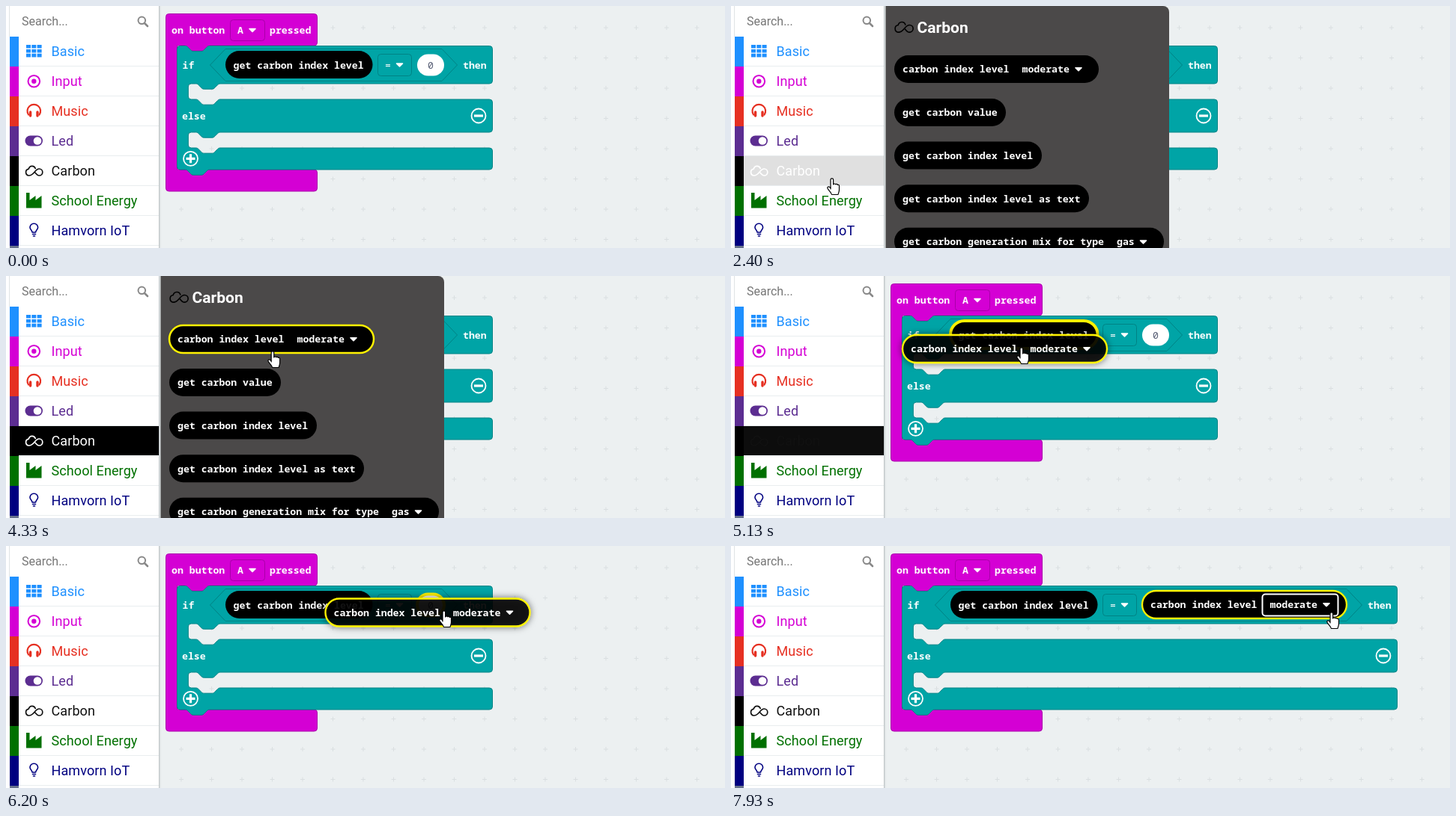
Animation, 960 px wide and 324 px high, one loop 8000 ms. Source, as an HTML page:

```html
<!DOCTYPE html>
<html lang="en">
<head>
<meta charset="utf-8">
<title>Block editor</title>
<style>
  html, body { margin: 0; width: 100%; height: 100%; overflow: hidden; background: #ecf0f1; }
  svg { display: block; width: 960px; height: 324px; }
  text { white-space: pre; }
  .code { font: 700 13.2px "Noto Sans Mono", "DejaVu Sans Mono", monospace; fill: #fff; }
  .label { font: 18px Roboto, sans-serif; letter-spacing: .1px; }
  .search { font: 16px Roboto, sans-serif; fill: #767676; }
  .title { font: 700 21px Roboto, sans-serif; fill: #fff; }
  .teal { fill: #00a4a6; stroke: #008385; }
  .pink { fill: #d400d4; stroke: #aa00aa; }
  .field { fill: none; }
  .line { fill: none; stroke-linecap: round; stroke-linejoin: round; }
</style>
</head>
<body>
<svg id="stage" viewBox="0 0 960 324"></svg>
<script>
const YELLOW = '#fff200';
const STEP = 200 / 3;
const LOOP = 8000;

// Connector shapes, drawn rightwards and leftwards
const notchR = 'c1.8 0 2.7.9 3.6 1.8l3.6 3.6c.9.9 1.8 1.8 3.6 1.8h10.8c1.8 0 2.7-.9 3.6-1.8l3.6-3.6c.9-.9 1.8-1.8 3.6-1.8';
const notchL = 'c-1.8 0-2.7.9-3.6 1.8l-3.6 3.6c-.9.9-1.8 1.8-3.6 1.8h-10.8c-1.8 0-2.7-.9-3.6-1.8l-3.6-3.6c-.9-.9-1.8-1.8-3.6-1.8';

const code = (x, y, s, more = '') => `<text class="code" x="${x}" y="${y}" ${more}>${s}</text>`;
const caret = (x, y) =>
  `<path d="M${x - 4} ${y - 2}h8l-4 4z" fill="#fff" stroke="#fff" stroke-width="1.6" stroke-linejoin="round"/>`;
const pill = (x, y, w, more = '') => `<rect x="${x}" y="${y}" width="${w}" height="37" rx="18.5" ${more}/>`;
const field = (x, y, w, h, color, more = '') =>
  `<rect class="field" x="${x}" y="${y}" width="${w}" height="${h}" rx="4" stroke="${color}" ${more}/>`;
const ring = (x, y, bars) =>
  `<circle cx="${x}" cy="${y}" r="9.5" fill="none" stroke="#fff" stroke-width="1.8"/>
   <path d="${bars}" stroke="#fff" stroke-width="3.2"/>`;

const levelPill = id => `<g id="${id}">
  ${pill(0, 0, 273, 'class="body"')}
  ${code(11, 23.3, 'carbon index level')}${code(170.5, 23.3, 'moderate')}${caret(246, 18.7)}
  ${field(160.5, 4.5, 101, 29, '#fff', 'stroke-width="2" visibility="hidden"')}
</g>`;

const cloud = 'M5 14.5A4.5 4.5 0 0 1 4.8 5.6C6 .8 12.3.5 13.7 5M5 14.5C12 14.5 13 5.5 18.8 5.5A4.5 4.5 0 0 1 18.8 14.5C16 14.5 14.500 12 12.700 9.700';

function ifPath(right) {
  const mouth = (y, end) =>
    `a4 4 0 0 1-4 4H286${notchL}h-6.3a4 4 0 0 0-4 4V${end - 4}a4 4 0 0 0 4 4h6.3${notchR}H${right - 4}a4 4 0 0 1 4 4`;
  return `M228.5 57.5a4 4 0 0 1 4-4H239.3${notchR}H${right - 4}a4 4 0 0 1 4 4V100${mouth(100, 125)}` +
    `V165${mouth(165, 190)}V215a4 4 0 0 1-4 4H271.7${notchL}H232.5a4 4 0 0 1-4-4z`;
}
const hexPath = tip => `M272.5 79L293 57.5H${tip - 20.5}L${tip} 79L${tip - 20.5} 100.5H293z`;

function grid() {
  let d = '';
  for (let x = 234; x < 960; x += 40.5)
    for (let y = 29; y < 324; y += 40.5) d += `M${x - 3} ${y}h6M${x} ${y - 3}v6`;
  return `<path d="${d}" stroke="#dadfe1" fill="none"/>`;
}

function workspace() {
  return `${grid()}
  <path class="pink" d="M213.5 14.5a4 4 0 0 1 4-4H411.5a4 4 0 0 1 4 4V49a4 4 0 0 1-4 4H271.7${notchL}H228.5V219H411.5a4 4 0 0 1 4 4V244a4 4 0 0 1-4 4H217.5a4 4 0 0 1-4-4z"/>
  ${code(221, 37, 'on button')}${field(299.5, 18.5, 46, 28, '#a900a9')}
  ${code(309, 37, 'A')}${caret(329, 32.5)}${code(352, 37, 'pressed')}
  <path id="ifBlock" class="teal"/>
  <path id="hex" class="teal"/>
  ${code(235.5, 84, 'if')}${code(235, 152, 'else')}
  ${ring(246.5, 204.3, 'M240.5 204.3h12M246.5 198.3v12')}
  <g id="shift">${code(610, 84, 'then')}${ring(631, 147, 'M625 147h12')}</g>
  ${pill(293, 60, 196.5, 'id="getPill"')}${code(303.5, 84, 'get carbon index level')}
  ${field(496.5, 64.5, 45, 29, '#008385')}${code(506, 84, '=', 'style="font-weight:400"')}${caret(525.5, 79)}
  <g id="zero"><rect id="zeroBox" x="549" y="64.5" width="36" height="29" rx="14.5" fill="#fff"/>
    ${code(563, 84, '0', 'style="fill:#575e75;font-weight:400"')}</g>`;
}

function flyout() {
  const names = [['get carbon value', 149], ['get carbon index level', 197],
    ['get carbon index level as text', 260], ['get carbon generation mix for type', 360]];
  return `<g id="flyout"><rect x="190" y="0" width="395" height="340" rx="8" fill="#4b4949"/>
  <path class="line" d="${cloud}" transform="translate(218 19.5) scale(1.08)" stroke="#000" stroke-width="1.5"/>
  <text class="title" x="248.5" y="35.5">Carbon</text>
  <g transform="translate(218 66)">${levelPill('stock')}</g>
  ${names.map(([s, w], i) => pill(218, 124 + 57.6 * i, w) + code(229, 147.3 + 57.6 * i, s)).join('')}
  ${code(515, 320.3, 'gas')}${caret(550.5, 316)}</g>`;
}

function sidebar() {
  const rows = [['Basic', '#1e90ff'], ['Input', '#d400d4'], ['Music', '#e63022'], ['Led', '#5c2d91'],
    ['Carbon', '#000'], ['School Energy', '#007000'], ['Hamvorn IoT', '#000080'], ['', '#66718c']];
  let cells = '';
  for (let i = 0; i < 9; i++)
    cells += `M${27 + (i % 3) * 7.3} ${52 + Math.floor(i / 3) * 5.9}h6v4.6h-6z`;
  const list = rows.map(([name, color], i) => {
    const y = 41 + 40 * i, carbon = name === 'Carbon';
    return `<rect x="5" y="${y}" width="12" height="40" fill="${color}"/>
      ${carbon ? `<rect id="row" x="17" y="${y}" width="187" height="39.5"/>` : ''}
      <path d="M17 ${y + 39.5}h187" stroke="#e9edef"/>
      <text class="label" x="60.5" y="${y + 26}" fill="${color}" ${carbon ? 'id="rowText"' : ''}>${name}</text>`;
  }).join('');
  return `<rect x="204" width="1" height="324" fill="#bfc5c7"/><rect x="205" width="1.5" height="324" fill="#dce1e2"/>
  <rect width="204" height="324" fill="#fff"/>
  <path d="M4.5 0v41" stroke="#e0e4e5"/>
  <text class="search" x="21" y="26">Search...</text>
  <circle cx="181.3" cy="19.3" r="4.8" fill="none" stroke="#888" stroke-width="2"/>
  <path class="line" d="M185 23l4 4" stroke="#888" stroke-width="2.6"/>
  ${list}
  <path d="${cells}" fill="#1e90ff"/>
  <circle cx="37.3" cy="100.7" r="7.8" fill="none" stroke="#d400d4" stroke-width="2"/>
  <circle cx="37.3" cy="100.7" r="3.2" fill="#d400d4"/>
  <path class="line" d="M30 145.5a8.8 8.8 0 1 1 14.6 0" stroke="#e63022" stroke-width="2.2"/>
  <path class="line" d="M32.6 142v5M42 142v5" stroke="#e63022" stroke-width="3.4"/>
  <rect x="25.5" y="173.5" width="23.5" height="14" rx="7" fill="#5c2d91"/><circle cx="42" cy="180.5" r="5.3" fill="#fff"/>
  <path id="rowIcon" class="line" d="${cloud}" transform="translate(25.5 212.5)" stroke-width="1.7"/>
  <path d="M27 250h4.5v10l8-6v6l8-6v16.5H27z" fill="#007000"/>
  <path class="line" d="M35 303c0-3-3-3.5-3-6.5a5.3 5.3 0 0 1 10.6 0c0 3-3 3.5-3 6.5zM35.5 305.5h4M36.5 308h2" stroke="#000080" stroke-width="1.6"/>`;
}

document.getElementById('stage').innerHTML = `
  <defs><filter id="shade" x="-10%" y="-60%" width="120%" height="220%">
    <feDropShadow dx="0" dy="0" stdDeviation="5" flood-color="#000" flood-opacity=".6"/></filter></defs>
  <rect width="960" height="324" fill="#ecf0f1"/>
  ${workspace()}${flyout()}${sidebar()}${levelPill('moved')}
  <path id="hand" fill="#fff" stroke="#000" stroke-width="1.2" stroke-linejoin="round" d="M5 15V2.6a1.8 1.8 0 0 1 3.6 0V9a1.7 1.7 0 0 1 3-.2 1.7 1.7 0 0 1 2.7.7 1.5 1.5 0 0 1 2.2 1.4V16c0 3-1 4-1.5 6.5H6.5C6 20 3.5 18 1.2 14.6a1.6 1.6 0 0 1 2.4-2.2L5 14z"/>`;

const $ = id => document.getElementById(id);
const set = (el, attrs) => { for (const a in attrs) el.setAttribute(a, attrs[a]); };
const show = (el, on) => set(el, { visibility: on ? 'visible' : 'hidden' });
const outline = (el, on, width) => set(el, { stroke: on ? YELLOW : 'none', 'stroke-width': width });
const stockBody = $('stock').querySelector('.body');
const movedBody = $('moved').querySelector('.body');
const focusBox = $('moved').querySelector('.field');

// Pointer track: step, left, top
const track = [[16, 369, 308], [20, 300, 262], [28, 168, 217], [32, 128, 230], [53, 128, 230],
  [60, 260, 155], [66, 367, 89], [68, 368, 82], [70, 369, 82], [76, 380.5, 94.5], [77, 381, 95],
  [82, 533, 135], [86, 573, 105], [89, 578, 90], [91, 578, 86], [101, 578, 86], [102, 611, 96],
  [106, 611, 96], [107, 618, 99], [111, 690, 121], [115, 775, 99], [119, 795, 88]];

function pointer(k) {
  if (k <= track[0][0]) return track[0].slice(1);
  const i = track.findIndex(p => p[0] >= k);
  if (i < 0) return track[track.length - 1].slice(1);
  const [a, b] = [track[i - 1], track[i]];
  const u = (k - a[0]) / (b[0] - a[0]);
  return [a[1] + (b[1] - a[1]) * u, a[2] + (b[2] - a[2]) * u];
}

// CSS "ease" curve, solved by bisection
function ease(x) {
  if (x <= 0) return 0;
  if (x >= 1) return 1;
  const bez = (p, q, s) => 3 * p * s * (1 - s) ** 2 + 3 * q * s * s * (1 - s) + s ** 3;
  let lo = 0, hi = 1;
  for (let i = 0; i < 20; i++) {
    const mid = (lo + hi) / 2;
    if (bez(.25, .25, mid) < x) lo = mid; else hi = mid;
  }
  return bez(.1, 1, lo);
}

const OPEN = 35, GRAB = 71, CLOSE = 76, RETARGET = 82, DROP = 96;

function rowShade(k) {
  if (k < OPEN) return 255 - 19 * Math.min(1, Math.max(0, (k - 28) / 5));
  if (k < CLOSE) return 236 * (1 - ease((k - OPEN) / 15));
  return 255 * ease((k - CLOSE) / 15);
}

function draw(k) {
  const [x, y] = pointer(k);
  const open = k >= OPEN && k < CLOSE;
  const dragging = k >= GRAB && k < DROP;
  const dropped = k >= DROP;
  const right = dropped ? 889.5 : 649.5;

  show($('hand'), k > 16);
  set($('hand'), { transform: `translate(${x} ${y})` });

  const g = Math.round(rowShade(k));
  set($('row'), { fill: `rgb(${g},${g},${g})` });
  set($('rowText'), { fill: open ? '#fff' : '#111' });
  set($('rowIcon'), { stroke: open ? '#fff' : '#111' });
  $('flyout').style.display = open ? '' : 'none';
  outline(stockBody, open && k > 60 && k < GRAB && y < 102, 2.5);

  set($('ifBlock'), { d: ifPath(right) });
  set($('hex'), { d: hexPath(right - 47) });
  const overHex = k >= 107 && y > 97 && y < 101;
  $('hex').style.stroke = overHex ? YELLOW : '';
  $('hex').style.strokeWidth = overHex ? 2.5 : '';
  set($('shift'), { transform: `translate(${dropped ? 240 : 0} 0)` });
  outline($('getPill'), k >= CLOSE && k < RETARGET, 4);
  outline($('zeroBox'), k >= RETARGET && !dropped, 4);
  $('zero').style.display = dropped ? 'none' : '';

  // The dragged block trails the pointer by one step
  const [px, py] = pointer(k - 1);
  const at = dropped ? [549, 60] : [px - 151.5, py - 15.5];
  $('moved').style.display = dragging || dropped ? '' : 'none';
  set($('moved'), { transform: `translate(${at})`, filter: dragging ? 'url(#shade)' : 'none' });
  outline(movedBody, true, 2.3);
  set(movedBody, { 'fill-opacity': dragging ? .85 : 1 });
  show(focusBox, dropped && x > 704 && y < 95);
}

let last = -1;
function tick() {
  const t = performance.now() % LOOP;
  const k = Math.min(119, Math.floor((t + 4) / STEP));
  if (k !== last) draw(last = k);
  requestAnimationFrame(tick);
}
tick();
</script>
</body>
</html>
```
